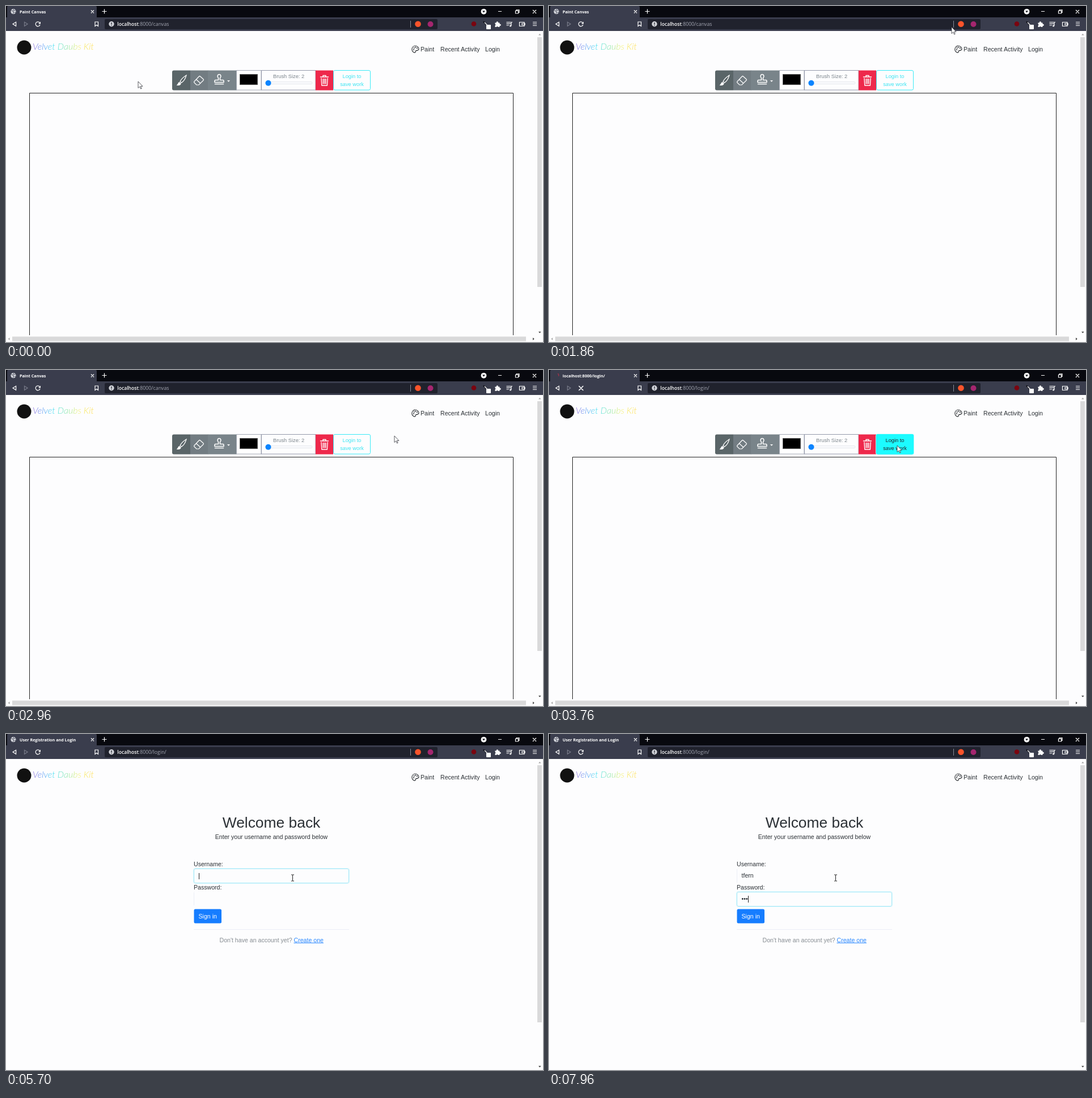
Recreate the animation shown at these times as an HTML page. Size 947 px wide and 592 px high, loop 8000 ms.

```html
<!DOCTYPE html>
<html lang="en">
<head>
<meta charset="utf-8">
<title>Paint Canvas</title>
<style>
html, body { margin: 0; width: 100%; height: 100%; overflow: hidden; background: #fdfdfe; }
svg { display: block; width: 947px; height: 592px; }
text { font: 10.6px "Liberation Sans", Arial, sans-serif; fill: #2b3035; white-space: pre; }
.ui { font: 8.8px "Open Sans", "Noto Sans", sans-serif; fill: #a4a7b3; }
.host { font-size: 8.6px; font-weight: 600; fill: #fff; }
.tab { font-size: 7.2px; font-weight: 700; fill: #fff; }
.small { font-size: 9.28px; }
.mid { text-anchor: middle; }
.line { fill: none; stroke: #fff; stroke-width: 1.2; }
.thick { fill: none; stroke: #fff; stroke-width: 1.6; stroke-linejoin: round; stroke-linecap: round; }
</style>
</head>
<body>
<svg viewBox="0 0 947 592">
  <defs>
    <linearGradient id="rainbow" gradientUnits="userSpaceOnUse" x1="47" x2="155" y1="0" y2="0">
      <stop offset="0" stop-color="#9570d8"/><stop offset=".14" stop-color="#5c8cf2"/>
      <stop offset=".34" stop-color="#3fdff2"/><stop offset=".58" stop-color="#8fe6a0"/>
      <stop offset=".75" stop-color="#f3f06a"/><stop offset="1" stop-color="#ffdc4a"/>
    </linearGradient>
    <g id="field">
      <rect x="-.5" y="-.5" width="275" height="27" rx="3" fill="none" stroke="#e0f8fd"/>
      <rect x=".5" y=".5" width="273" height="25" rx="2.5" fill="#fdfdfe" stroke="#a2e8f8"/>
    </g>
  </defs>
  <rect width="947" height="592" fill="#fdfdfe"/>

  <!-- browser frame -->
  <rect width="947" height="20" fill="#08090f"/>
  <rect y="20" width="947" height="24" fill="#3a3d4d"/>
  <path d="M2 20V2q0-2 2-2H158q2 0 2 2V20Z" fill="#3a3d4d"/>
  <rect x="174" y="23" width="587" height="18" rx="2" fill="#20222d"/>
  <g id="globe">
    <circle cx="13" cy="9.7" r="4.6" fill="#d5d7dd"/>
    <path d="M9.5 8l3 1 1 2-1 2.5M13 5.5l.5 2 3 .5M15 12l2-1" fill="none" stroke="#4a4d5c" stroke-width="1.1"/>
  </g>
  <path id="spinner" d="M15.5 6.3a4.2 4.2 0 0 1 1.5 4.5" fill="none" stroke="#a8324a" stroke-width="1.2"/>
  <text id="tab" class="ui tab" x="24" y="12.6"></text>
  <path class="line" d="M150 7.5l5 5m0-5l-5 5M169.5 9.5h8M173.5 5.500v8M868 9.5h6M929 7l6 6m0-6l-6 6"/>
  <path class="line" d="M898.5 8.5h5v4.5h-5zM900 8V6.800h5V11.5h-1.5"/>
  <circle cx="842.5" cy="9.8" r="4.9" fill="#fff"/>
  <path d="M840 8.5h5l-2.5 3.2z" fill="#14151d"/>
  <path class="line" d="M17.6 28.3v7l-5.6-3.5z"/>
  <path class="line" d="M32.5 28.3v7l5.6-3.5z" style="stroke:#777a88"/>
  <g id="reload"><path class="line" d="M60 33a4 4 0 1 1-.8-3.8"/><path d="M61 27.5v4h-4z" fill="#fff"/></g>
  <path id="stop" class="thick" d="M53 28.5l7 7m0-7l-7 7"/>
  <path class="line" d="M157 28h5.5v7.5l-2.7-2-2.8 2z"/>
  <circle cx="186" cy="31.8" r="4.7" fill="#d0d2d8"/>
  <path d="M186 29v3.5m0 1v1.2" stroke="#20222d" stroke-width="1.3"/>
  <text class="ui" x="196.3" y="35"><tspan class="host">localhost</tspan><tspan id="path"></tspan></text>
  <path d="M713.5 26v12" stroke="#8a8d9a"/>
  <circle cx="726.5" cy="31.8" r="5.3" fill="#fb542b"/>
  <circle cx="748.5" cy="32" r="5" fill="#a4266f"/>
  <circle cx="825" cy="31.5" r="4.3" fill="#7a0510"/>
  <path class="thick" d="M842.5 28l5 5" style="stroke:#15161d;stroke-width:2.4"/>
  <path class="line" d="M844 29l5 5"/>
  <rect x="847" y="33" width="8" height="8" rx="1" fill="#fff"/>
  <path d="M862.5 29.5h2.3a1.7 1.7 0 1 1 3.2 0h2.5v2.3a1.7 1.7 0 1 1 0 3.2v2h-2.7a1.5 1.5 0 0 0-2.8 0h-2.5v-2.5a1.5 1.5 0 0 0 0-2.8z" fill="#fff"/>
  <path class="line" d="M882.5 28.5h8M882.5 31.2h8M882.5 34h4.5M891 29v6M890.8 28.5h2.2"/>
  <circle cx="889.6" cy="35" r="1.6" fill="#fff"/>
  <path class="line" d="M905.5 28.5h8.5v7h-8.5zM910 30.5h5v3h-5zM929 28.5h7M929 31.5h7M929 34.5h7"/>

  <!-- site header -->
  <circle cx="32" cy="73" r="12.5" fill="#111"/>
  <text x="47" y="77" style="font:italic 300 16px Lato,cursive;fill:url(#rainbow)">Velvet Daubs Kit</text>
  <path d="M722 70.3c-8 0-8 11.5-1 11.8 2 0 1-2.3 1.5-3 1-1.5 5.5.5 5.5-3.5 0-3-3-5.3-6-5.3z" fill="none" stroke="#212529" stroke-width="1.1"/>
  <g fill="#212529"><circle cx="719" cy="77" r="1"/><circle cx="719.6" cy="74" r="1"/><circle cx="722.3" cy="72.7" r="1"/><circle cx="725" cy="74.3" r="1"/></g>
  <text x="731" y="79.7">Paint</text>
  <text x="766" y="79.7">Recent Activity</text>
  <text x="845" y="79.7">Login</text>
  <path d="M939 51.5h4.6l-2.3-2.7z" fill="#a5a5a5"/>
  <rect id="thumb" x="937" y="55" width="8" fill="#d9d9da"/>
  <path id="down" d="M939-1.2h4.6l-2.3 2.7z" fill="#444"/>

  <g id="paint">
    <path d="M41.5 580V153.5H894.5V580" fill="none" stroke="#222"/>
    <rect x="11" y="582.5" width="906" height="8" fill="#d9d9da"/>
    <path d="M6.5 584.3v4.6l-2.7-2.3z" fill="#a5a5a5"/>
    <path d="M929 584.3v4.6l2.7-2.3z" fill="#444"/>
    <path d="M325 113.5v35h-29q-3 0-3-3v-29q0-3 3-3z" fill="#5a6568"/>
    <rect x="325" y="113.5" width="31.5" height="35" fill="#727c82"/>
    <rect x="356" y="113.5" width="50.5" height="35" fill="#79848a"/>
    <path class="line" d="M318 122q-8 5-11 11l2.5 2.3q6-4 8.5-13.3z"/>
    <path d="M306 134c-3 0-2.5 4.5-5.5 5.5 4 1.5 8.5 0 8-3.5z" fill="#fff"/>
    <path class="line" d="M332 133l8.5-9q1-1 2 0l5.5 5q1 1 0 2l-8 8h-4l-4-4q-1-1 0-2zM335.5 129.5l7.5 6.8"/>
    <path class="thick" d="M374.5 130.5v-3.5c-2.5-2.5-1.5-6.5 1.5-6.5s4 4 1.5 6.5v3.5h5q1.5 0 1.5 1.5v2.5h-16v-2.5q0-1.5 1.5-1.5zM368.5 137.5h15"/>
    <path d="M390 131h5l-2.5 2.8z" fill="#fff"/>
    <rect x="406.5" y="113.5" width="43.5" height="34.5" fill="#fff" stroke="#a3a8b4"/>
    <rect x="412.5" y="120.5" width="31" height="18" stroke="#555"/>
    <rect x="450.5" y="113.5" width="95.5" height="34.5" fill="#fdfdfe" stroke="#9599ab"/>
    <text class="small" x="471" y="126.7" style="fill:#7b848b">Brush Size: 2</text>
    <rect x="457" y="133.5" width="83" height="4" rx="2" fill="#f9fafc" stroke="#e3e5eb" stroke-width=".8"/>
    <circle cx="462.5" cy="135.7" r="5" fill="#0a84ff"/>
    <rect x="546" y="113.5" width="31" height="35" fill="#ee284b"/>
    <path class="thick" d="M554.5 125h14M559 124.5v-2h5v2M556 127.5l.8 12.5h9.6l.8-12.5M559.3 128.5v8.5M561.6 128.5v8.5M563.9 128.5v8.5" style="stroke-width:1.4"/>
    <rect id="ring" x="576" y="112.5" width="68" height="37" rx="4" fill="#b5f8fb"/>
    <rect x="577.5" y="113.5" width="65" height="34.5" rx="2.5" fill="#fdfdfe" stroke="#3aeaf7"/>
    <rect id="hover" x="577" y="113" width="66" height="35.5" rx="3" fill="#1cfbff"/>
    <g id="label"><text class="small mid" x="610" y="126.7">Login to</text><text class="small mid" x="610" y="140.5">save work</text></g>
  </g>

  <g id="login">
    <text class="mid" x="468" y="164.6" style="font-size:26.4px">Welcome back</text>
    <text class="mid" x="468" y="185.3">Enter your username and password below</text>
    <text x="331" y="232.7">Username:</text>
    <text x="331" y="273.6">Password:</text>
    <path d="M331.5 238v24M331.5 279v23M331 344.5h274" stroke="#eceef7"/>
    <use id="focusUser" href="#field" x="331" y="237"/>
    <use id="focusPass" href="#field" x="331" y="278"/>
    <text id="user" x="339.5" y="253.4"></text>
    <text id="pass" x="339.5" y="294.2"></text>
    <rect id="caret" width="1" fill="#222"/>
    <rect x="331.5" y="308.5" width="48.5" height="25" rx="2.5" fill="#167dff"/>
    <text x="339.5" y="324.7" style="fill:#fff">Sign in</text>
    <text x="376.5" y="366.6" style="fill:#868c92">Don't have an account yet? <tspan fill="#2a88ff" text-decoration="underline">Create one</tspan></text>
  </g>

  <path id="arrow" d="M0 0V11.5L2.7 9 4.6 13 6.2 12.3 4.4 8.4H8Z" fill="#fff" stroke="#33343c" stroke-width=".8"/>
  <path id="beam" d="M-2.5-5.5h2q.5 0 .5.5 0-.5.5-.5h2M0-5V5M-2.5 5.5h2q.5 0 .5-.5 0 .5.5.5h2" fill="none" stroke="#222"/>
</svg>
<script>
const $ = id => document.getElementById(id);
const clamp = v => Math.max(0, Math.min(1, v));
const ramp = (t, from, to) => clamp((t - from) / (to - from));
const show = (id, on) => { $(id).style.display = on ? '' : 'none'; };
const fade = (id, v) => { $(id).style.opacity = v; };

const LOOP = 8000, CLICK = 3560, LOADED = 4150, FOCUS = 4830, TAB = 6830;
const USER = 'tfern';
const KEYS_USER = [5930, 6000, 6100, 6170, 6270];
const KEYS_PASS = [7860, 7900, 7960];

// time, x, y, moving through the point (1) or resting (0)
const PATH = [
  [0, 233, 133, 0], [1060, 710, 37, 0], [1840, 710, 37, 0], [2960, 685, 116, 1],
  [3450, 614, 133, 0], [4100, 614, 133, 0], [4460, 523, 213, 1], [4830, 505.5, 253.5, 0]
];

function slope(i, axis) {
  if (!PATH[i][3]) return 0;
  const a = PATH[i - 1], b = PATH[i + 1];
  return (b[axis] - a[axis]) / (b[0] - a[0]);
}

function pointer(t, axis) {
  const i = PATH.findIndex(p => p[0] > t) - 1;
  if (i < 0) return PATH[PATH.length - 1][axis];
  const a = PATH[i], b = PATH[i + 1], d = b[0] - a[0];
  const u = (t - a[0]) / d, v = 1 - u;
  return a[axis] * v * v * (1 + 2 * u) + b[axis] * u * u * (3 - 2 * u)
    + d * u * v * (slope(i, axis) * v - slope(i + 1, axis) * u);
}

const typed = (keys, t) => keys.filter(k => k <= t).length;

function drawBrowser(t) {
  const loading = t >= CLICK && t < LOADED, onLogin = t >= LOADED;
  $('tab').textContent = loading ? 'localhost:8000/login/' : onLogin ? 'User Registration and Login' : 'Paint Canvas';
  $('path').textContent = t < CLICK ? ':8000/canvas' : ':8000/login/';
  show('globe', !loading);
  show('spinner', loading);
  show('reload', !loading);
  show('stop', loading);
  $('spinner').setAttribute('transform', `rotate(${(t - 3760) * 0.36} 13 9.7)`);
  $('thumb').setAttribute('height', onLogin ? 453 : 440);
  $('down').setAttribute('transform', `translate(0 ${onLogin ? 586 : 575})`);
  show('paint', !onLogin);
  show('login', onLogin);
}

function drawForm(t) {
  const inPass = t >= TAB, shift = ramp(t, TAB, TAB + 200);
  $('user').textContent = USER.slice(0, typed(KEYS_USER, t));
  $('pass').textContent = '•'.repeat(typed(KEYS_PASS, t));
  fade('focusUser', 1 - shift);
  fade('focusPass', shift);
  const text = $(inPass ? 'pass' : 'user');
  const width = text.textContent ? text.getComputedTextLength() : 0;
  const caret = $('caret');
  caret.setAttribute('x', Math.round(339.7 + width));
  caret.setAttribute('y', inPass ? 285 : 245);
  caret.setAttribute('height', inPass ? 12 : 11);
  const blink = (t >= 5330 && t < 5700) || (t >= 7330 && t < 7700);
  show('caret', t >= FOCUS && !blink);
}

function frame(now) {
  const t = now % LOOP;
  drawBrowser(t);
  if (t >= LOADED) drawForm(t);

  const x = pointer(t, 1), y = pointer(t, 2);
  const hover = ramp(t, 3300, 3450);
  fade('hover', hover);
  fade('ring', ramp(t, CLICK, CLICK + 100));
  document.querySelectorAll('#label text').forEach(e => { e.style.fill = hover > 0.5 ? '#212529' : '#3ce4f2'; });

  const typing = t >= LOADED && y >= 238;
  show('arrow', !typing);
  show('beam', typing);
  $(typing ? 'beam' : 'arrow').setAttribute('transform', `translate(${x} ${y})`);
  requestAnimationFrame(frame);
}
requestAnimationFrame(frame);
</script>
</body>
</html>
```
